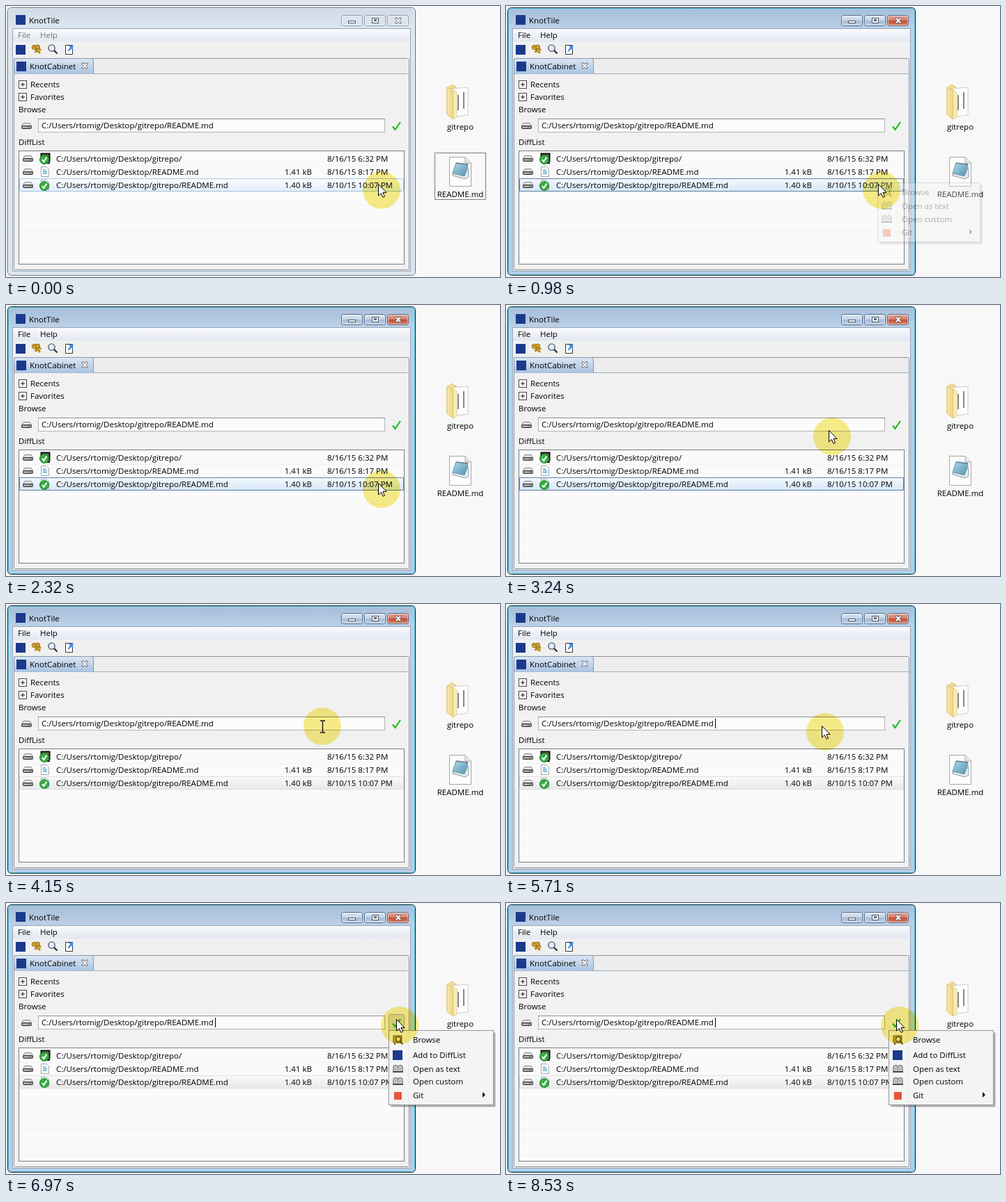
Animation, 709 px wide and 390 px high, one loop 8630 ms. Source, as an HTML page:

```html
<!DOCTYPE html>
<html lang="en">
<head>
<meta charset="utf-8">
<title>File browser context menus</title>
<style>
html, body { margin: 0; width: 100%; height: 100%; overflow: hidden; background: #f8f8f8; }
svg { display: block; width: 709px; height: 390px; }
text { font: 11.5px "Open Sans", "Noto Sans", sans-serif; fill: #000; white-space: pre; }
.end { text-anchor: end; }
.mid { text-anchor: middle; }
.dots { stroke-dasharray: 1 1; stroke-dashoffset: .5; }
</style>
</head>
<body>
<svg id="stage" viewBox="0 0 709 390" xmlns="http://www.w3.org/2000/svg">
<defs>
  <linearGradient id="frameOn" x2="0" y2="1">
    <stop stop-color="#a5bdd9"/><stop offset=".08" stop-color="#bdd1e8"/><stop offset="1" stop-color="#b4cce7"/>
  </linearGradient>
  <linearGradient id="frameOff" x2="0" y2="1">
    <stop stop-color="#d0dae6"/><stop offset=".08" stop-color="#dde6f0"/><stop offset="1" stop-color="#d7e3f0"/>
  </linearGradient>
  <linearGradient id="bar" x2="0" y2="1">
    <stop stop-color="#fafbfd"/><stop offset=".5" stop-color="#eceff6"/><stop offset="1" stop-color="#e3e7f1"/>
  </linearGradient>
  <linearGradient id="tab" x2="0" y2="1"><stop stop-color="#dbe6f3"/><stop offset="1" stop-color="#a9c3e1"/></linearGradient>
  <linearGradient id="btn" x2="0" y2="1">
    <stop stop-color="#dde8f4"/><stop offset=".48" stop-color="#c3d3e6"/><stop offset=".5" stop-color="#a4bad4"/><stop offset="1" stop-color="#bed2e8"/>
  </linearGradient>
  <linearGradient id="red" x2="0" y2="1">
    <stop stop-color="#e8ab9d"/><stop offset=".48" stop-color="#d67a66"/><stop offset=".5" stop-color="#c04a32"/><stop offset="1" stop-color="#dc8668"/>
  </linearGradient>
  <linearGradient id="hover" x2="0" y2="1"><stop stop-color="#fafcfe"/><stop offset="1" stop-color="#e2eefa"/></linearGradient>
  <linearGradient id="picked" x2="0" y2="1"><stop stop-color="#f3f8fd"/><stop offset="1" stop-color="#d6e7f8"/></linearGradient>
  <linearGradient id="faded" x2="0" y2="1"><stop stop-color="#fafafa"/><stop offset="1" stop-color="#e8e8e8"/></linearGradient>
  <linearGradient id="folder"><stop stop-color="#f9eaae"/><stop offset="1" stop-color="#ecd27a"/></linearGradient>
  <linearGradient id="note" x2="1" y2="1"><stop stop-color="#b5dcea"/><stop offset="1" stop-color="#4a91b0"/></linearGradient>

  <g id="logo"><rect width="14" height="14" fill="#1c3a8c"/></g>
  <g id="disk">
    <path d="M3 1.5H12L14.5 5.5H.5Z" fill="#e2e2e2" stroke="#888"/>
    <rect x=".5" y="5.5" width="14" height="4" rx="1" fill="#858585" stroke="#3c3c3c"/>
    <path d="M2 7.5H9" stroke="#d8d8d8"/><rect x="11" y="7" width="2" height="1" fill="#7fd36b"/>
  </g>
  <g id="badge">
    <circle cx="7" cy="6" r="6.5" fill="#35ad40" stroke="#1c8429"/>
    <path d="M3.8 6L6.2 9L10.4 2.6" fill="none" stroke="#fff" stroke-width="2"/>
  </g>
  <g id="screen">
    <path d="M2.5 .5H14.5V11.5H2.5Z" fill="#6e6a55" stroke="#111" stroke-width="2"/><path d="M9 14H15" stroke="#111" stroke-width="2"/>
  </g>
  <g id="page">
    <path d="M2.5 .5H10L13.5 4V14.5H2.5Z" fill="#fcfdff" stroke="#9aa9b8"/>
    <path d="M5 5H9M5 7.5H11M5 10H11" stroke="#61a7c7" stroke-width="1.4"/>
  </g>
  <g id="keys" fill="none" stroke="#8a6510">
    <path d="M6 6L13 13M8 8L6 12M11 6L14 9" stroke="#b98a1c" stroke-width="3"/>
    <circle cx="4.5" cy="4.5" r="3.2" fill="#e2b83c"/><circle cx="9.5" cy="4" r="3" fill="#d1a32b"/>
    <circle cx="4" cy="4" r=".8" fill="#fff"/>
  </g>
  <g id="lens">
    <path d="M8.5 8.5L13.5 13.5" stroke="#333" stroke-width="2.4"/>
    <circle cx="5.5" cy="5.5" r="4.6" fill="#e2eefb" stroke="#50596a" stroke-width="1.4"/>
  </g>
  <g id="export">
    <path d="M1.5 1.5H11.5V14.5H1.5Z" fill="#fff" stroke="#333"/>
    <path d="M12.5 1L6 2.5L8 4.5L4.5 9.5L6 10.5L10 6.5L11.5 8.5Z" fill="#3c8be0"/>
  </g>
  <g id="find">
    <path d="M1 1H13V11H1Z" fill="#c8ad2d" stroke="#6a5a12"/>
    <circle cx="8" cy="6" r="3.4" fill="#f2e9b0" stroke="#5e5117" stroke-width="1.4"/>
    <path d="M10.5 8.5L14.5 13.5M3 12V14" stroke="#5e5117" stroke-width="2"/>
  </g>
  <g id="book">
    <path d="M1 10.5V4Q1 1.5 4 1.5Q7.5 1.5 7.5 4Q7.5 1.5 11 1.5Q14 1.5 14 4V10.5Z" fill="#d2d2d2" stroke="#555"/>
    <path d="M7.5 4V11M3 5H6M3 7.5H6M9 5H12M9 7.5H12" stroke="#8a8a8a"/><path d="M0 11H15" stroke="#333" stroke-width="1.6"/>
  </g>
  <g id="git"><rect x="2" y="2" width="11" height="11" fill="#e8553a"/></g>
  <g id="check"><path d="M1 7.5L4.5 12L12 1" fill="none" stroke="#19bd19" stroke-width="2.2"/></g>
  <g id="plus"><rect x=".5" y=".5" width="11" height="11" fill="#fff" stroke="#444"/><path d="M3 6H9M6 3V9" stroke="#111"/></g>
  <g id="cross"><path d="M1 1H3.2L5 3L6.8 1H9V2.5L6.8 5L9 7.5V9H6.8L5 7L3.2 9H1V7.5L3.2 5L1 2.5Z" fill="#fff" stroke="#555" stroke-width=".9"/></g>
</defs>
<g id="scene"></g>
</svg>
<script>
const LOOP = 8630;
const APP = "KnotTile", PANEL = "KnotCabinet", HOME = "C:/Users/rtomig/Desktop/";
const FILE = HOME + "gitrepo/README.md";
const $ = id => document.getElementById(id);

const text = (x, y, s, extra = "") => `<text x="${x}" y="${y}" ${extra}>${s}</text>`;
const icon = (id, x, y) => `<use href="#${id}" x="${x}" y="${y}"/>`;
const box = (x, y, w, h, fill, stroke = "none", extra = "") =>
  `<rect x="${x + .5}" y="${y + .5}" width="${w}" height="${h}" fill="${fill}" stroke="${stroke}" ${extra}/>`;
const path = (d, stroke, fill = "none", extra = "") => `<path d="${d}" stroke="${stroke}" fill="${fill}" ${extra}/>`;

const frame = (id, edge, rim, fill, button, close, line) => `<g id="${id}">
  ${box(2, 2, 585, 385, `url(#${fill})`, edge, 'rx="5"')}
  ${box(3, 3, 583, 383, "none", rim, 'rx="4"')}
  ${[481, 514, 547].map((x, i) =>
    box(x, 13, 30, 15, i > 1 ? close : button, line, 'rx="3"')
    + box(x + 1, 14, 28, 13, "none", "#fff", 'rx="2" stroke-opacity=".55"')).join("")}
</g>`;

function windowBody() {
  const rows = [
    ["gitrepo/", "", "8/16/15 6:32 PM"],
    ["README.md", "1.41 kB", "8/16/15 8:17 PM"],
    ["gitrepo/README.md", "1.40 kB", "8/10/15 10:07 PM"]
  ];
  const row = (id, stroke, extra) => box(19, 248, 551, 18, `url(#${id})`, stroke, extra);
  let lines = "";
  for (let y = 229.5; y < 371; y += 19) lines += `M19 ${y}H571`;
  return icon("logo", 14, 13) + text(33, 25, APP)
    + box(491, 21, 10, 3, "#fff", "#4d5866") + box(525, 17, 9, 7, "#fff", "#4d5866") + box(528, 19, 3, 2, "#8294aa", "#4d5866")
    + icon("cross", 558, 16)
    + box(9, 32, 571, 349, "#f0f0f0", "#97a8bb")
    + box(10, 33, 569, 18, "url(#bar)")
    + `<g id="menubar">${text(17, 46, "File")}${text(49, 46, "Help")}</g>`
    + icon("logo", 14, 56) + icon("keys", 36, 55) + icon("lens", 60, 55) + icon("export", 84, 55)
    + box(11, 75, 567, 304, "#f1f1f1", "#919191", 'rx="2"')
    + box(12, 76, 565, 21, "#ededed")
    + path("M12 97.5H578", "#a0acba")
    + path("M11.5 98V78Q11.5 75.5 14 75.5H122Q125.5 75.5 125.5 79V97.5", "#8599b2", "url(#tab)")
    + icon("logo", 15, 80) + text(34, 91, PANEL) + icon("cross", 108, 81)
    + icon("plus", 18, 107) + text(35, 117, "Recents")
    + icon("plus", 18, 125) + text(35, 135, "Favorites")
    + text(18, 153, "Browse") + icon("disk", 22, 167)
    + box(46, 162, 497, 19, "#fbfbfb", "#b4b4b4") + path("M46 162.5H544", "#8f8f8f")
    + text(51, 176, FILE)
    + `<path id="caret" d="M300.5 165V179" stroke="#000"/>`
    + box(549, 160, 22, 23, "#dcdcdc", "#aaa", 'id="press" rx="2"')
    + icon("check", 554, 166)
    + text(18, 200, "DiffList")
    + box(18, 208, 553, 163, "#fafafa", "#777c84")
    + path(lines, "#f2f2f2")
    + row("hover", "#a3c6ea", 'id="rowHover" rx="2"')
    + `<g id="rowPicked">${row("picked", "#9dc0e6", 'rx="2"')}${box(19, 248, 551, 18, "none", "#2c4763", 'class="dots"')}</g>`
    + row("faded", "#e0e0e0", 'id="rowFaded" rx="2"')
    + rows.map(([name, size, date], i) => {
      const y = 224 + 19 * i;
      return icon("disk", 24, y - 10) + icon(i ? "page" : "screen", 48, y - 12) + (i == 1 ? "" : icon("badge", 48, y - 9))
        + text(72, y, HOME + name) + text(439, y, size, 'class="end"') + text(461, y, date);
    }).join("");
}

const desktop = () =>
  path("M633 118L640 113L646 117V160L633 155Z", "#e0c774", "url(#folder)")
  + path("M640 119L663 117V157L640 160Z", "#ccc", "#fdfdfd")
  + path("M649 128V150M657 124V148", "#888", "none", 'stroke-width="2"')
  + path("M633 117L642 121V163L633 156Z", "#dcc06a", "url(#folder)")
  + path("M642 121L647 124V160L642 163Z", "#e3d191", "#f8edbd")
  + text(652, 178, "gitrepo", 'class="mid"')
  + path("M636.5 217.5H659L667.5 226V259.5H636.5Z", "#a5a5a5", "#fdfdfd")
  + path("M659 217.5V226H667.5", "#a5a5a5", "#e8e8e8")
  + path("M646 226L663 228L658 245L641 241Z", "#5b8ea5", "url(#note)")
  + path("M641 241L658 245L663 232L664 246L659 249L641 244Z", "#8a9aa3", "#e6eef2")
  + path("M646 226L663 228", "#667", "none", 'stroke-width="2" stroke-dasharray="1 1"')
  + text(652, 275, "README.md", 'class="mid"')
  + box(615, 211, 73, 67, "none", "#000", 'id="focus" class="dots"');

function menu(id, x, y, w, h, items) {
  const last = items[items.length - 1][2];
  return `<g id="${id}">${box(x + 3, y + 3, w, h, "#000", "none", 'opacity=".3"')}
    ${box(x, y, w, h, "#f4f4f4", "#979797")}
    ${path(`M${x + 28.5} ${y + 3}V${y + h - 2}`, "#e8e8e8")}
    ${items.map(([mark, label, base]) => icon(mark, x + 6, base - 11) + text(x + 35, base, label)).join("")}
    ${path(`M${x + w - 15} ${last - 9}l4 4l-4 4Z`, "none", "#111")}</g>`;
}

$("scene").innerHTML = desktop()
  + frame("inactive", "#5f6670", "#f4f8fc", "frameOff", "#dbe4ee", "#dbe4ee", "#8d9bac")
  + frame("active", "#101820", "#5ed3ee", "frameOn", "url(#btn)", "url(#red)", "#536a86")
  + windowBody()
  + menu("rowMenu", 533, 254, 147, 85,
    [["find", "Browse", 272], ["book", "Open as text", 292], ["book", "Open custom", 311], ["git", "Git", 330]])
  + menu("fieldMenu", 549, 183, 150, 107,
    [["find", "Browse", 201], ["logo", "Add to DiffList", 223], ["book", "Open as text", 243], ["book", "Open custom", 261], ["git", "Git", 281]])
  + `<circle id="halo" r="27" fill="#faee88" style="mix-blend-mode:multiply"/>`
  + `<path id="arrow" d="M0 0V16.5L3.8 13L6.5 18.8L9 17.7L6.4 12H11.5Z" fill="#fff" stroke="#000"/>`
  + `<path id="beam" d="M-3.5 -8.5H-1L0 -7.5L1 -8.5H3.5M0 -7.5V7.5M-3.5 8.5H-1L0 7.5L1 8.5H3.5" fill="none" stroke="#111" stroke-width="1.3"/>`;

// Each step changes only the listed values.
const steps = [
  [0, { x: 534, y: 256, active: 0, row: "rowHover", focus: 1, rowMenu: 0, fieldMenu: 0, caret: 0, press: 0, beam: 0 }],
  [910, { active: 1, row: "rowPicked", focus: 0 }],
  [980, { rowMenu: .3 }],
  [1050, { rowMenu: .6 }],
  [1120, { rowMenu: .85 }],
  [1190, { rowMenu: 1 }],
  [2250, { rowMenu: .4 }],
  [2320, { rowMenu: 0 }],
  [3030, { x: 525, y: 246 }],
  [3100, { x: 502, y: 221 }],
  [3170, { x: 477, y: 195 }],
  [3240, { x: 463, y: 180 }],
  [3520, { x: 458, y: 178, beam: 1 }],
  [3590, { x: 454, y: 176 }],
  [3730, { row: "rowFaded", caret: 1 }],
  [4150, { caret: 0 }],
  [4720, { caret: 1 }],
  [5710, { x: 453, y: 175, beam: 0 }],
  [5780, { x: 455 }],
  [5990, { x: 459 }],
  [6060, { x: 465, y: 174 }],
  [6200, { x: 475, y: 173 }],
  [6340, { x: 494, y: 171 }],
  [6410, { x: 520, y: 169 }],
  [6480, { x: 545, y: 168 }],
  [6550, { x: 560, y: 167 }],
  [6690, { press: 1 }],
  [6760, { fieldMenu: .3 }],
  [6830, { fieldMenu: .6 }],
  [6900, { fieldMenu: .85 }],
  [6970, { fieldMenu: 1 }],
  [7040, { press: .5 }],
  [7110, { press: 0 }]
];

const fade = (id, value) => $(id).setAttribute("opacity", value);
const place = (id, x, y) => $(id).setAttribute("transform", `translate(${x} ${y})`);

function draw() {
  const t = performance.now() % LOOP;
  const s = Object.assign({}, ...steps.filter(([at]) => at <= t).map(step => step[1]));
  for (const id of ["active", "focus", "rowMenu", "fieldMenu", "caret", "press", "beam"]) fade(id, s[id]);
  for (const id of ["rowHover", "rowPicked", "rowFaded"]) fade(id, +(id === s.row));
  fade("inactive", 1 - s.active);
  fade("menubar", s.active ? 1 : .5);
  fade("arrow", 1 - s.beam);
  place("arrow", s.x + .5, s.y + .5);
  place("beam", s.x + .5, s.y + .5);
  place("halo", s.x + (s.beam ? 0 : 5), s.y + (s.beam ? 0 : 9));
  requestAnimationFrame(draw);
}
draw();
</script>
</body>
</html>
```
